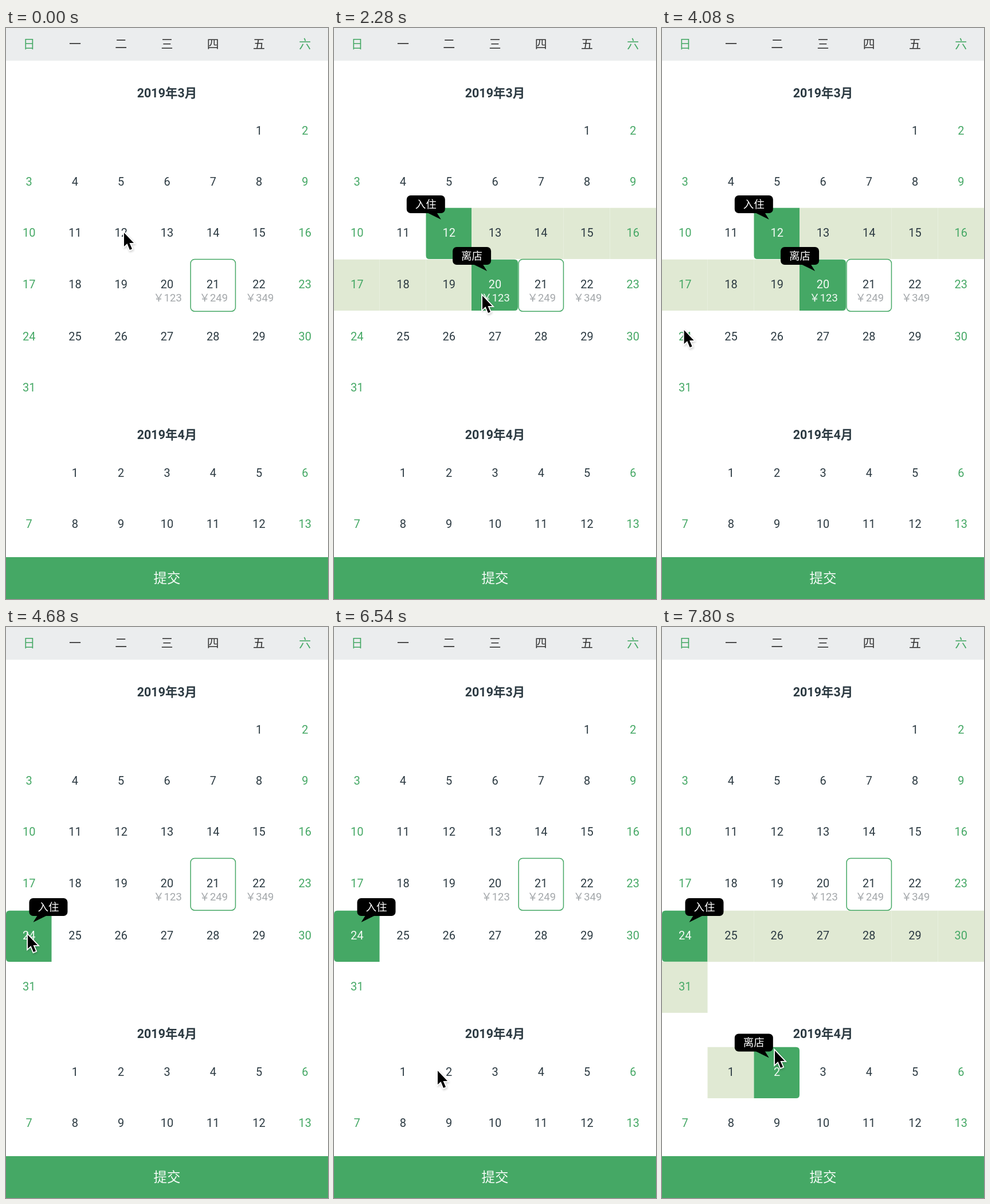
An HTML page for the animation above (7860 ms loop, 562 px wide and 996 px high).

```html
<!DOCTYPE html>
<html lang="zh-CN">
<head>
<meta charset="utf-8">
<title>日历</title>
<style>
  html, body { margin: 0; width: 100%; height: 100%; overflow: hidden; background: #fff; }
  svg { display: block; width: 562px; height: 996px; }
  text { font-family: Roboto, "Noto Sans CJK SC", "Noto Sans CJK", sans-serif; text-anchor: middle; }
</style>
</head>
<body>
<svg id="stage" viewBox="0 0 562 996"></svg>
<script>
const LOOP = 7860, STEP = 60, COL = 562 / 7;
const GREEN = '#45a865', RANGE = '#e0e9d3', DARK = '#2c3a42', GRAY = '#a3a7aa';
const WHITE = '#fff', PALE = '#f3faf5';
const stage = document.getElementById('stage');

function add(parent, tag, attrs, content) {
  const node = document.createElementNS('http://www.w3.org/2000/svg', tag);
  for (const key in attrs) node.setAttribute(key, attrs[key]);
  if (content !== undefined) node.textContent = content;
  return parent.appendChild(node);
}
const label = (parent, content, x, y, size, fill, weight = 400) =>
  add(parent, 'text', { x, y, fill, 'font-size': size, 'font-weight': weight }, content);

const centerX = col => (col + 0.5) * COL;
// Column edges snap to whole units of a 375-wide layout.
const edgeX = col => col === 7 ? 562 : Math.floor(col * 375 / 7) * 1.5;
const dayColor = col => col % 6 ? DARK : GREEN;

// Rectangle rounded on the left side, the right side or neither.
function cellPath(x, y, w, h, left, right) {
  const l = left ? 6 : 0, r = right ? 6 : 0;
  return `M${x + l} ${y}H${x + w - r}q${r} 0 ${r} ${r}V${y + h - r}q0 ${r} ${-r} ${r}` +
         `H${x + l}q${-l} 0 ${-l} ${-l}V${y + l}q0 ${-l} ${l} ${-l}Z`;
}

const fills = add(stage, 'g', {}), texts = add(stage, 'g', {}), bubbles = add(stage, 'g', {});
const prices = { 20: 123, 21: 249, 22: 349 };
const cells = [];

function addMonth(title, titleY, firstCol, days, offset, rows) {
  label(texts, title, 281, titleY, 21.5, DARK, 700);
  for (let d = 1; d <= days; d++) {
    const slot = firstCol + d - 1, col = slot % 7, y = rows[Math.floor(slot / 7)];
    const cell = { id: offset + d, col, y };
    cell.box = add(fills, 'path', { 'shape-rendering': 'geometricPrecision' });
    cell.text = label(texts, d, centerX(col), y + 7, 20, dayColor(col));
    if (!offset && prices[d])
      cell.price = label(texts, '￥' + prices[d], centerX(col) + 1, y + 29.7, 18.5, GRAY);
    cells.push(cell);
  }
}
addMonth('2019年3月', 120.5, 5, 31, 0, [179, 268, 357, 447, 538, 627]);
addMonth('2019年4月', 717, 1, 13, 31, [776, 864.5]);

add(fills, 'rect', { x: 322.2, y: 403.4, width: 78.3, height: 90.8, rx: 7,
  fill: WHITE, stroke: GREEN, 'stroke-width': 1.5 });

add(stage, 'rect', { width: 562, height: 57, fill: '#ebedee' });
[...'日一二三四五六'].forEach((name, col) =>
  label(stage, name, centerX(col), 34.5, 21, col % 6 ? '#333' : GREEN));
add(stage, 'rect', { y: 923, width: 562, height: 73, fill: GREEN });
label(stage, '提交', 281, 967.5, 23.5, PALE);

function makeBubble(name) {
  const group = add(bubbles, 'g', {});
  add(group, 'rect', { x: -33.5, width: 67, height: 31, rx: 7 });
  const tail = add(group, 'path', { d: 'M2 30L26.5 42L19 30Z' });
  label(group, name, 0, 21.5, 18.5, WHITE);
  return { group, tail };
}
const checkIn = makeBubble('入住'), checkOut = makeBubble('离店');

function placeBubble(bubble, id) {
  bubble.group.setAttribute('visibility', id ? 'visible' : 'hidden');
  if (!id) return;
  const { col, y } = cells[id - 1];
  const x = centerX(col) + (col ? -40.4 : 33.8);
  bubble.group.setAttribute('transform', `translate(${x} ${y - (id > 31 ? 66.5 : 65)})`);
  bubble.tail.setAttribute('transform', col ? '' : 'scale(-1 1)');
}

const arrow = 'M0 0V24L5.5 19L10 30L14 28.3L9.5 18H17Z';
const cursor = add(stage, 'g', {});
add(cursor, 'path', { d: arrow, transform: 'translate(1 2)', stroke: '#000', 'stroke-width': 5,
  'stroke-linejoin': 'round', opacity: 0.14, style: 'filter:blur(1.5px)' });
add(cursor, 'path', { d: arrow, stroke: WHITE, 'stroke-width': 3.6, 'paint-order': 'stroke' });

// time, first day, last day
const selections = [[0, 0, 0], [540, 12, 0], [1500, 12, 20], [4380, 24, 0], [7140, 24, 33]];
// time, x, y
const path = [
  [0, 206, 357], [660, 206, 357], [1260, 282, 456], [1560, 282, 456], [2220, 259, 467],
  [2580, 259, 467], [3180, 41.5, 473.5], [3540, 41.5, 473.5], [4260, 38, 537], [5160, 38, 537],
  [6360, 181, 774], [6660, 181, 774], [7080, 197, 766], [7320, 197, 766], [7740, 197, 739]
];

function cursorAt(t) {
  const next = path.findIndex(key => key[0] > t);
  if (next < 0) return path[path.length - 1].slice(1);
  const a = path[next - 1], b = path[next];
  const p = (t - a[0]) / (b[0] - a[0]), e = p * p * (3 - 2 * p);
  return [1, 2].map(i => a[i] + (b[i] - a[i]) * e);
}

let shown;
function select(selection) {
  if (selection === shown) return;
  shown = selection;
  const [, first, last] = selection;
  for (const { id, col, y, box, text, price } of cells) {
    const isFirst = id === first, isLast = id === last;
    const end = isFirst || isLast;
    const inside = id > first && id < last;
    const x = edgeX(col);
    box.setAttribute('d', cellPath(x, y - 43.2, edgeX(col + 1) - x, 89.2, isFirst, isLast));
    box.setAttribute('fill', end ? GREEN : inside ? RANGE : 'none');
    text.setAttribute('fill', end ? PALE : dayColor(col));
    if (price) price.setAttribute('fill', end ? PALE : GRAY);
  }
  placeBubble(checkIn, first);
  placeBubble(checkOut, last);
}

function render(time) {
  const t = Math.floor((time % LOOP) / STEP) * STEP;
  select(selections.filter(s => s[0] <= t).pop());
  cursor.setAttribute('transform', `translate(${cursorAt(t).join(' ')})`);
}

const start = performance.now();
function tick() {
  render(performance.now() - start);
  requestAnimationFrame(tick);
}
tick();
</script>
</body>
</html>
```
